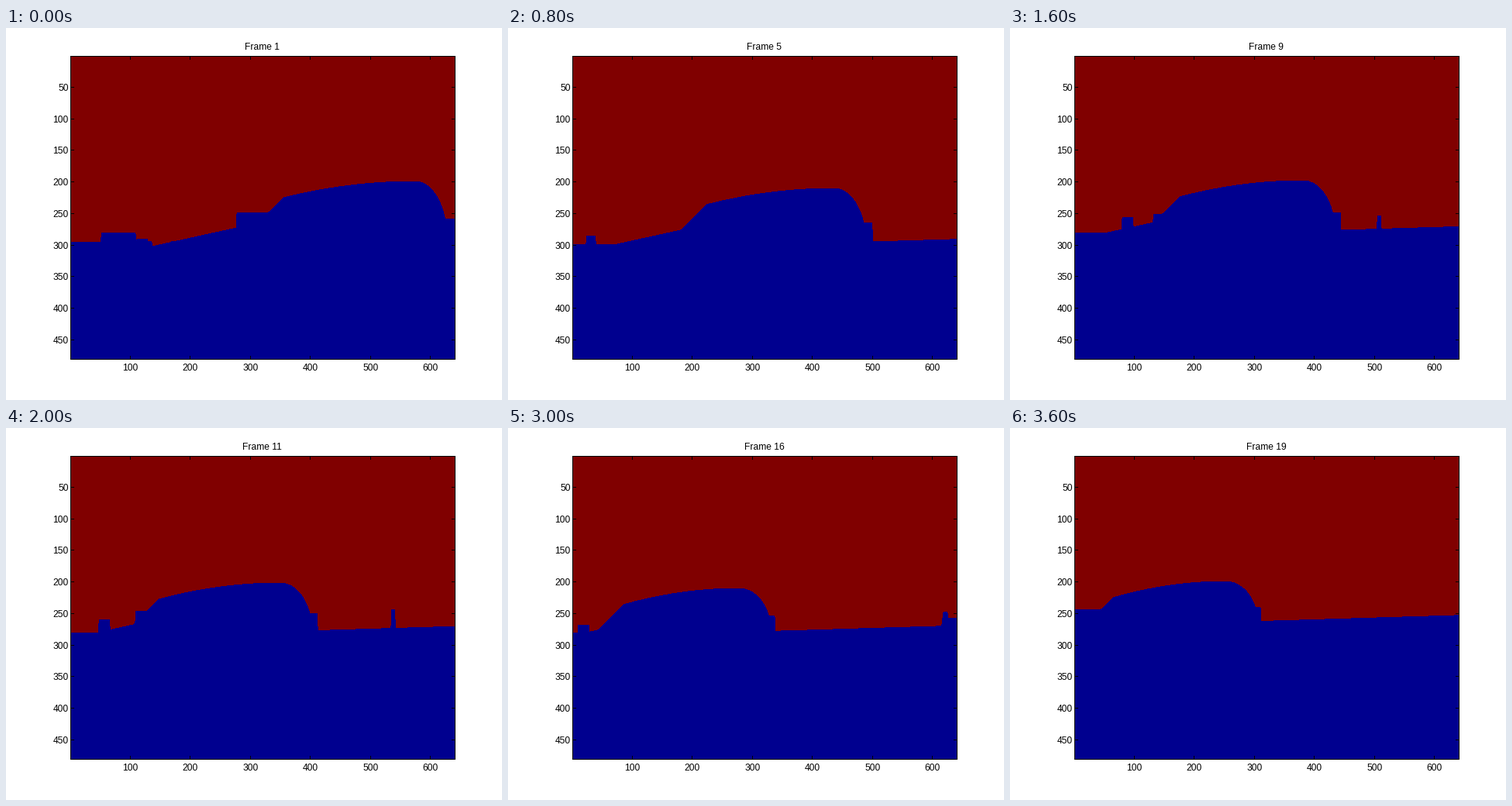
Write a matplotlib script that moves like this. It is 640 px wide and 480 px high and loops after 3.8 s.

```python
import numpy as np
import matplotlib.pyplot as plt
from matplotlib.animation import FuncAnimation
from matplotlib.patches import Polygon, Rectangle

FRAMES, STEP = 19, 200
X0, Y0, W, H = 83.2, 36, 496, 391.2
L, T, R, B = 83, 36, 580, 428  # outer pixel edges of the plot
RED, BLUE = (128 / 255, 0, 0), (0, 0, 143 / 255)
PX = 72 / 80  # points per pixel
KEYS = [0, 2, 4, 8, 12, 15, 18]

plt.rcParams["font.family"] = "Liberation Sans"
xs = np.linspace(L, R, 641)


def track(i, *values):
    return np.interp(i, KEYS, values)


def box(left, right, top):
    """Height of a block with upright sides, empty elsewhere."""
    return np.where((xs >= left) & (xs <= right), top, np.inf)


def car(i, x, roof, drop):
    """Car heading left; x is the top of its windscreen."""
    tail = x + 170 - 1.4 * i
    u = np.clip((xs - x) / (tail - x), 0, 1)
    v = np.clip((xs - tail) / 41, 0, 1)
    screen = roof + 21 + (x - xs)
    bonnet = roof + 54 + 0.22 * (x - 33 - xs)
    top = roof + 21 * (1 - u) ** 2
    back = roof + drop * (1 - np.sqrt(1 - v ** 2))
    body = np.select([xs < x, xs < tail], [np.minimum(screen, bonnet), top], back)
    rear = tail + 51 - 0.3 * i
    bumper = box(tail, rear, roof + 0.65 * drop)
    mirror = box(x - track(i, 60, 40, 36, 34, 27, 33, 50), x,
                 roof + track(i, 40, 53, 56, 43, 30, 54, 36))
    return [body, bumper, mirror], rear


def ground(i, level, rear):
    slope = np.where(xs > rear, 0.03, 0.01)
    gap = np.abs(xs - (201 - 12.5 * i)) < 13
    return level - slope * (xs - rear) + gap * np.clip(34 - 8.5 * i, 0, 17)


def scenery(i, roof, level):
    """Blocks on both sides of the road."""
    mid, half = 145 - 9.5 * i, 22 - 4 * i
    shed = box(mid - half, mid + half, level - 8)
    hut_x = np.interp(i, [6, 8, 12, 15, 18], [176, 152, 102, 97, 91])
    hut = box(hut_x - 7, hut_x + 7, roof + 47 if i > 6 else level)
    post_x = np.interp(i, [6, 8, 12, 15, 17], [440, 474, 520, 562, 590])
    post = box(post_x, post_x + 5,
               roof + np.interp(i, [8, 12, 15], [45, 23, 30]))
    wall = box(560 + 25 * abs(i - 15), R, roof + 38)
    return [shed, hut, post, wall]


def skyline(i):
    x = track(i, 358, 303, 256, 219, 176, 149, 133)
    roof = track(i, 198, 204, 207, 197, 203, 207, 198)
    drop = 74 - 1.25 * i
    parts, rear = car(i, x, roof, drop)
    level = roof + drop
    parts += [ground(i, level, rear)] + scenery(i, roof, level)
    ys = np.min(parts, axis=0)
    return np.vstack([[L, B], np.column_stack([xs, ys]), [R, B]])


fig = plt.figure(figsize=(8, 6), dpi=80, facecolor="white")
ax = fig.add_axes([0, 0, 1, 1])
ax.set(xlim=(0, 640), ylim=(480, 0))
ax.axis("off")

ax.add_patch(Rectangle((L, T), R - L, B - T, fc=RED, ec="none"))
land = ax.add_patch(Polygon(np.zeros((3, 2)), fc=BLUE, ec="none",
                            antialiased=False))


def line(px, py):
    """Black one-pixel line through the centres of the given pixels."""
    ax.plot(np.floor(px) + 0.5, np.floor(py) + 0.5, color="black", lw=PX,
            snap=False, solid_capstyle="projecting")


def label(x, y, text, ha="center"):
    return ax.text(x, y, text, fontsize=12 * PX, ha=ha, va="baseline")


right, bottom = R - 1, B - 1
line([L, right, right, L, L], [T, T, bottom, bottom, T])
for v in range(100, 601, 100):
    x = X0 + (v - 0.5) * W / 640
    line([x, x], [bottom, bottom - 4])
    line([x, x], [T, T + 4])
    label(x, 442, str(v))
for v in range(50, 451, 50):
    y = Y0 + (v - 0.5) * H / 480
    line([L, L + 4], [y, y])
    line([right, right - 4], [y, y])
    label(80.5, y + 4.6, str(v), "right")
title = label(330.5, 28, "")


def draw(i):
    land.set_xy(skyline(i))
    title.set_text(f"Frame {i + 1}")
    return land, title


anim = FuncAnimation(fig, draw, frames=FRAMES, interval=STEP, repeat=True,
                     repeat_delay=0, init_func=lambda: draw(0))
plt.show()
```
